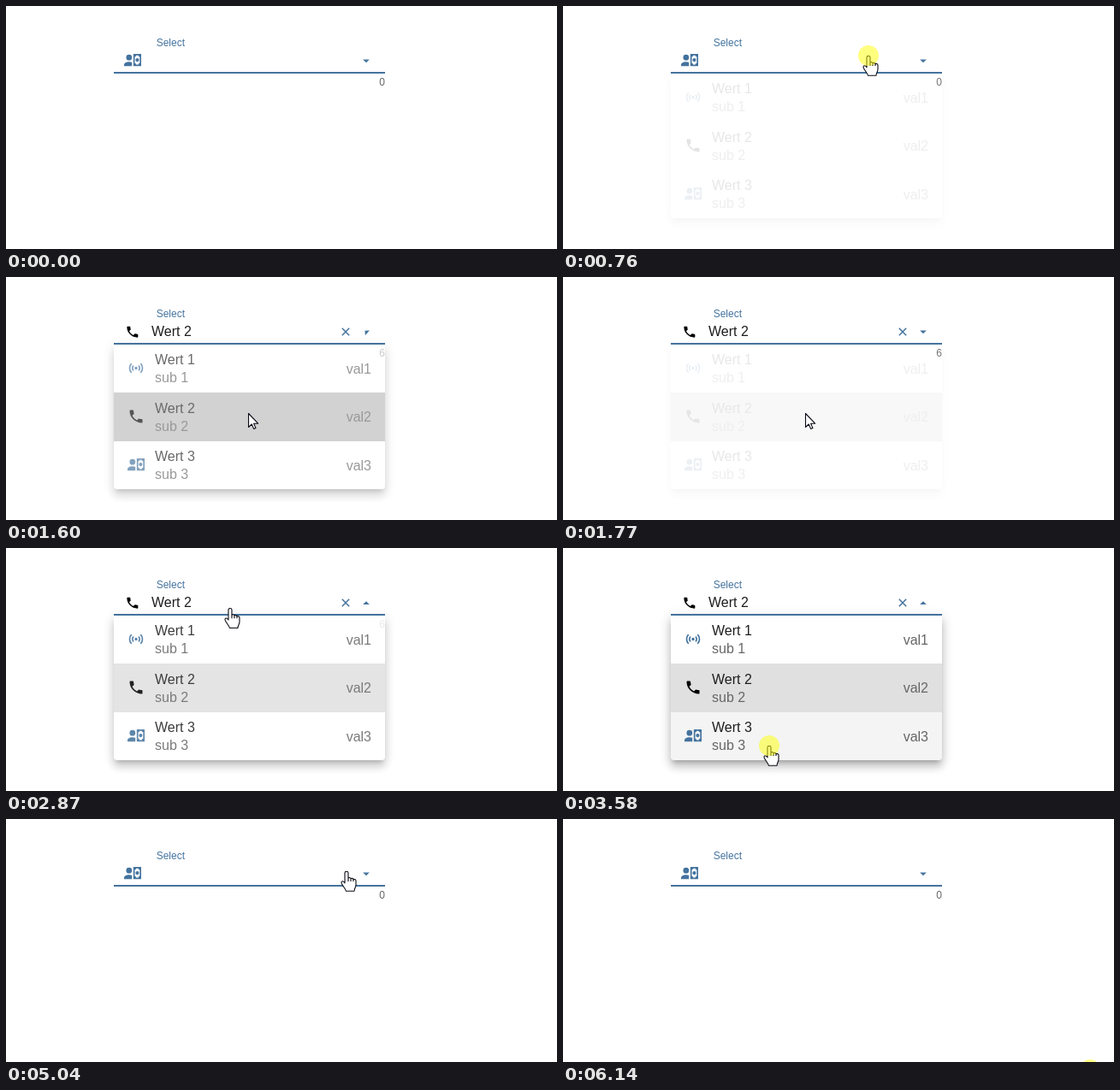
Write an HTML page that moves like this. It is 644 px wide and 284 px high and loops after 6290 ms.

```html
<!DOCTYPE html>
<html lang="de">
<head>
<meta charset="utf-8">
<title>Select field</title>
<style>
  html, body { margin: 0; width: 100%; height: 100%; overflow: hidden; background: #fff; }
  svg { display: block; }
  text { font: 16px "Liberation Sans", Arial, sans-serif; fill: #1e1e1e; }
  .small { font-size: 12px; }
  .muted { fill: #666; }
  .accent { fill: #44739e; }
  .end { text-anchor: end; }
  .panel {
    width: 317px; height: 169px; margin: 79px 0 0 126px;
    background: #fff; border-radius: 0 0 4px 4px;
    box-shadow: 0 5px 5px -3px rgba(0, 0, 0, .2), 0 8px 10px 1px rgba(0, 0, 0, .14),
      0 3px 14px 2px rgba(0, 0, 0, .12);
  }
  #cursor path { fill: #fff; stroke: #0a0a14; stroke-width: 1.1; stroke-linejoin: round; }
</style>
</head>
<body>
<svg width="644" height="284" viewBox="0 0 644 284">
  <defs>
    <symbol id="signal" viewBox="0 0 24 24">
      <g fill="none" stroke="#44739e" stroke-width="2">
        <path d="M5.64 5.64A9 9 0 0 0 5.64 18.36M18.36 5.64A9 9 0 0 1 18.36 18.36"/>
        <path d="M8.46 8.46A5 5 0 0 0 8.46 15.54M15.54 8.46A5 5 0 0 1 15.54 15.54"/>
      </g>
      <circle class="accent" cx="12" cy="12" r="2"/>
    </symbol>
    <symbol id="phone" viewBox="0 0 24 24">
      <path d="M6.6 10.8A15 15 0 0 0 13.2 17.4L15.4 15.2A1 1 0 0 1 16.4 14.9A11 11 0 0 0 20 15.5A1 1 0 0 1 21 16.5V20A1 1 0 0 1 20 21A17 17 0 0 1 3 4A1 1 0 0 1 4 3H7.5A1 1 0 0 1 8.5 4A11 11 0 0 0 9.1 7.6A1 1 0 0 1 8.8 8.6Z"/>
    </symbol>
    <symbol id="person" viewBox="0 0 24 24">
      <g class="accent">
        <circle cx="7" cy="8" r="4"/>
        <path d="M11 14.7V20H0V18C0 15.8 3.1 14 7 14C8.5 14 9.9 14.3 11 14.7Z"/>
        <path fill-rule="evenodd" d="M13 3H24V20H13ZM22 7A2 2 0 0 1 20 5H17A2 2 0 0 1 15 7V16A2 2 0 0 1 17 18H20A2 2 0 0 1 22 16Z"/>
        <circle cx="18.5" cy="11.5" r="2.5"/>
      </g>
    </symbol>
  </defs>

  <text class="small accent" x="175.7" y="47">Select</text>
  <use id="fieldIcon"/>
  <text id="value" x="170" y="69"></text>
  <path id="clear" d="M392.8 59.8l8.4 8.4m0-8.4l-8.4 8.4" stroke="#44739e" stroke-width="1.5"/>
  <path id="caret" class="accent" d="M417.2 62.4h7.6l-3.8 3.8z"/>
  <text id="count" class="small muted end" x="443" y="93"></text>
  <g id="menu">
    <foreignObject width="644" height="284"><div class="panel"></div></foreignObject>
  </g>
  <rect class="accent" x="126" y="77" width="317" height="2"/>
  <g id="cursor">
    <path id="arrow" d="M.5.5V16.5L4.2 13L6.7 18.6L9 17.6L6.6 12.2H11.6Z"/>
    <path id="hand" d="M-2 2C-2-.3 2-.3 2 2V8.3C2.4 7 5 7.2 5 9C5.5 7.8 8 8.2 8 10C8.6 9 11 9.3 11 11.3V16C11 19 9 20 9 23.3H-.5C-1 20.5-6 15.5-6 13.2C-6 11-3.5 11.5-2 13.8ZM2 8.3V12M5 9V12M8 10V12"/>
    <circle id="press" r="12" fill="#ff0" fill-opacity=".5"/>
  </g>
</svg>
<script>
const LOOP = 6290, ENTER = 130, CLEARED = 4880, PRESS_TIME = 110;
const FIELD = { left: 126, right: 443, top: 36, bottom: 79 };
const ROW = 56.5, ROWS = 3;
const $ = id => document.getElementById(id);

const origin = { x: 482, y: 220 };
const moves = [
  { from: ENTER, to: 530, x: 357, y: 58 },
  { from: 920, to: 1300, x: 283, y: 159 },
  { from: 1900, to: 2550, x: 262, y: 63 },
  { from: 2860, to: 3260, x: 241, y: 231 },
  { from: 3740, to: 4660, x: 398, y: 61 },
  { from: 5150, to: 5830, x: 616, y: 293 }
];
const presses = [680, 1380, 2590, 3580, 4810, 6140];
const visits = [{ open: 740, pick: 1460, row: 1 }, { open: 2690, pick: 3620, row: 2 }];

const progress = (t, from, length) => Math.max(0, Math.min(1, (t - from) / length));
const smooth = k => k * k * (3 - 2 * k);
const easeOut = k => Math.sin(k * Math.PI / 2);
const rowTop = index => FIELD.bottom + index * ROW;

// The vertical part leads, which bends each stroke of the mouse.
function cursorAt(t) {
  let { x, y } = origin;
  for (const move of moves) {
    const k = progress(t, move.from, move.to - move.from);
    x += (move.x - x) * smooth(k);
    y += (move.y - y) * easeOut(k);
  }
  return { x, y };
}

const isOpen = t => visits.some(v => t >= v.open && t < v.pick);
const menuOpacity = t => Math.max(...visits.map(v =>
  progress(t, v.open, 210) - progress(t, v.pick + 40, 300)));
const selectedRow = t => t < CLEARED ? visits.findLast(v => t >= v.pick)?.row : undefined;

function isHovered(index, t) {
  const { y } = cursorAt(t);
  return y >= rowTop(index) && y < rowTop(index + 1);
}

function rowShade(index, t) {
  const samples = 8, fade = 160;
  let hover = 0;
  for (let i = 0; i < samples; i++) hover += isHovered(index, t - i * fade / samples) / samples;
  const chosen = visits.filter(v => v.row === index);
  const ripple = Math.max(0, ...chosen.map(v => progress(t, v.pick - 40, 150) * (t < v.pick + 400)));
  return .043 * hover + .1 * ripple + .12 * (selectedRow(t) === index);
}

function addRow(icon, index) {
  const n = index + 1, y = rowTop(index), top = Math.floor(y);
  const bottom = Math.floor(rowTop(n)) - 4;
  const corners = n === ROWS ? "a4 4 0 0 1-4 4H130a4 4 0 0 1-4-4" : "v4H126v-4";
  $("menu").insertAdjacentHTML("beforeend", `
    <path class="shade" d="M126 ${top}H443V${bottom}${corners}Z"/>
    <use href="#${icon}" x="142" y="${y + 17.5}" width="20" height="20"/>
    <text x="174" y="${Math.round(y + 23)}">Wert ${n}</text>
    <text class="muted" x="174" y="${Math.round(y + 44)}">sub ${n}</text>
    <text class="muted end" x="427" y="${Math.floor(y + 34)}">val${n}</text>`);
}
["signal", "phone", "person"].forEach(addRow);
const shades = document.querySelectorAll(".shade");

function setAttrs(el, attrs) {
  for (const name in attrs) el.setAttribute(name, attrs[name]);
}
const show = (id, on) => { $(id).style.visibility = on ? "visible" : "hidden"; };

function drawField(t, opacity) {
  const row = selectedRow(t);
  const value = row === undefined ? "" : `Wert ${row + 1}`;
  $("value").textContent = value;
  $("count").textContent = value.length;
  show("clear", value);
  setAttrs($("fieldIcon"), row === 1
    ? { href: "#phone", x: 139.2, y: 55.5, width: 17.3, height: 17.3 }
    : { href: "#person", x: 138, y: 53.5, width: 20, height: 20 });
  const turn = 180 * progress(opacity, .15, .7);
  setAttrs($("caret"), { transform: `rotate(${turn} 421 64.2)` });
}

function drawCursor(t) {
  const { x, y } = cursorAt(t);
  const bottom = isOpen(t) ? rowTop(ROWS) : FIELD.bottom;
  const pointing = x > FIELD.left && x < FIELD.right && y > FIELD.top && y < bottom;
  setAttrs($("cursor"), { transform: `translate(${x} ${y})` });
  show("arrow", t >= ENTER && !pointing);
  show("hand", t >= ENTER && pointing);
  show("press", presses.some(at => t >= at && t < at + PRESS_TIME));
}

function render(t) {
  const opacity = menuOpacity(t);
  $("menu").style.opacity = opacity;
  shades.forEach((el, i) => setAttrs(el, { "fill-opacity": rowShade(i, t) }));
  drawField(t, opacity);
  drawCursor(t);
}

const start = performance.now();
function loop() {
  render((performance.now() - start) % LOOP);
  requestAnimationFrame(loop);
}
loop();
</script>
</body>
</html>
```
